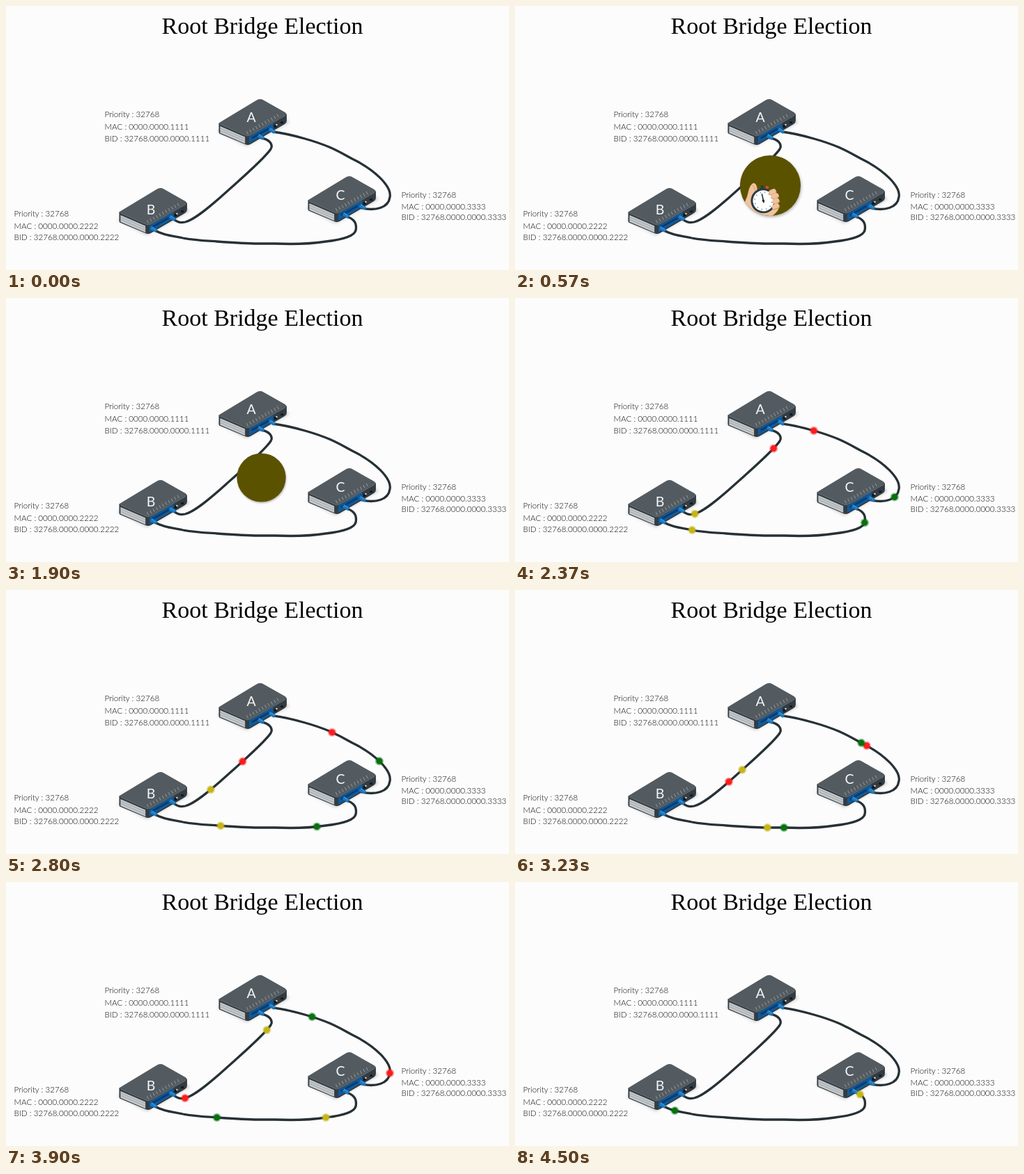
Animation of 722 by 380 pixels, one loop 4.53 s. Source, as an HTML page:

```html
<!DOCTYPE html>
<html lang="en">
<head>
<meta charset="utf-8">
<title>Root Bridge Election</title>
<style>
  html, body { margin: 0; height: 100%; overflow: hidden; background: #fcfcfc; }
  svg { display: block; width: 722px; height: 380px; }
  .title { font: 34px "Liberation Serif", serif; text-anchor: middle; fill: #000; }
  .info { font: 300 11.6px Lato, sans-serif; fill: #0c0c0c; }
  .label { font: 19.5px Lato, sans-serif; fill: #f4f6f7; text-anchor: middle; }
  .cable { fill: none; stroke: #263136; stroke-width: 3.3; stroke-linecap: round; }
  .plug { stroke: #1a7ac4; stroke-width: 5; }
</style>
</head>
<body>
<svg viewBox="0 0 722 380">
  <defs>
    <filter id="blur" x="-30%" y="-30%" width="160%" height="160%"><feGaussianBlur stdDeviation="2"/></filter>
    <clipPath id="disc"><circle r="43.5"/></clipPath>
    <pattern id="weave" width="6" height="6" patternUnits="userSpaceOnUse" patternTransform="rotate(40)">
      <rect width="6" height="6" fill="#e8661f"/>
      <path d="M0 0h3v3h-3z" fill="#f6a72c"/>
    </pattern>
    <g id="router" transform="translate(354.2 167.2) scale(.965) translate(-354.5 -168)">
      <path d="M301 181L345 204L409 168L400 160Z" fill="#aaa" opacity=".6" filter="url(#blur)"/>
      <path d="M304 169V183Q304 185 307 186L343 201Q347 203 351 201L402 171Q405 169 405 166V156Z" fill="#333c42"/>
      <path d="M306 174L343 190V200L306 184Z" fill="#c5c9cc"/>
      <path d="M306 177L343 193M306 180.5L343 196.5" stroke="#92999d" stroke-width=".8"/>
      <path d="M349 190L385 169V179L349 200Z" fill="#0f5a9c"/>
      <path d="M353 192L378 178" stroke="#083c70" stroke-width="3"/>
      <path d="M388 172v4M398 167v3" stroke="#11181b" stroke-width="4"/>
      <circle cx="390" cy="172" r="1.3" fill="#cfd5d8"/>
      <path d="M306 168L359 136Q365 132 370 135L402 153Q407 156 402 159L352 187Q347 190 342 187L307 172Q303 170 306 168Z" fill="#535b61"/>
      <path d="M306 171L342 187Q347 190 352 187L403 158" fill="none" stroke="#666f75"/>
      <path d="M346 184L396 156" stroke="#8f989d" stroke-width="5" stroke-dasharray="1 4.2"/>
    </g>
  </defs>

  <rect width="722" height="380" fill="#fcfcfc"/>
  <text class="title" x="368" y="40">Root Bridge Election</text>
  <g id="routers"></g>
  <path class="cable" id="AB" d="M366 190C378 192 384 199 380 206C372 218 345 242 326 259L307 276C291 290 270 308 257 311C247 313 244 309 239 306"/>
  <path class="cable" id="AC" d="M383 181C400 183 415 187 429 191C465 201 480 211 497 220C530 236 554 260 551 275C549 291 530 295 511 291"/>
  <path class="cable" id="BC" d="M212 322C225 330 240 331 254 334C270 337 290 338 303 339C330 341 345 342 362 342H386C410 343 440 342 459 339C485 336 500 331 502 323C504 313 500 306 488 303"/>
  <g id="plugs"></g>
  <g id="dots"></g>

  <g id="timer">
    <circle r="43" cx="1" cy="2" opacity=".35" filter="url(#blur)"/>
    <circle r="43.5" fill="#5b5200"/>
    <g clip-path="url(#disc)"><g id="hand">
      <path d="M-45 22L-25 10L-8 30L-26 44Z" fill="url(#weave)"/>
      <path d="M-27 12C-29 4 -29 -5 -23 -11C-16 -16 -12 -28 -4 -29C2 -28 -1 -18 -4 -13L16 19C8 26 -2 25 -10 30Z" fill="#f0c39b"/>
      <path d="M-6 -27C-3 -25 -4 -20 -6 -17" fill="none" stroke="#d79f75"/>
      <path d="M5 -15L7 -21" stroke="#2a3a47" stroke-width="4"/>
      <path d="M11 -14L14 -17" stroke="#d84a32" stroke-width="4"/>
      <circle r="18" fill="#2a3a47"/>
      <circle r="15" fill="#fff"/>
      <circle r="12.5" fill="none" stroke="#71808a" stroke-width="2" stroke-dasharray="1 5.54"/>
      <path d="M-.5 3L2 -10" stroke="#222e36" stroke-width="1.6"/>
      <circle r="1.8" fill="#222e36"/>
      <path d="M15 -6H19M16 1H20M15 8H18M11 15H15" stroke="#d79f75" stroke-width="7.4" stroke-linecap="round"/>
      <path d="M15 -7H19M16 0H20M15 7H18M11 14H15" stroke="#f0c39b" stroke-width="6.4" stroke-linecap="round"/>
    </g></g>
  </g>
</svg>
<script>
const LOOP = 4530;
const $ = id => document.getElementById(id);

function add(parent, tag, attrs, text = "") {
  const el = document.createElementNS("http://www.w3.org/2000/svg", tag);
  for (const key in attrs) el.setAttribute(key, attrs[key]);
  el.textContent = text;
  return parent.appendChild(el);
}

// name, router offset, label position, text left edge, text baselines, MAC digit
const routers = [
  ["A", 0, 0, 352, 167, 141.5, [160, 178, 195], 1],
  ["B", -143, 128, 208, 300, 11.5, [303, 321, 337], 2],
  ["C", 128, 111, 480, 279, 567.5, [276, 293, 308], 3],
];
for (const [name, dx, dy, lx, ly, x, lines, digit] of routers) {
  const mac = "0000.0000." + String(digit).repeat(4);
  const info = ["Priority : 32768", "MAC : " + mac, "BID : 32768." + mac];
  add($("routers"), "use", { href: "#router", x: dx, y: dy });
  add($("routers"), "text", { class: "label", x: lx, y: ly }, name);
  info.forEach((line, i) => add($("routers"), "text", { class: "info", x, y: lines[i] }, line));
}

for (const [x, y] of [[366, 189], [382, 180], [212, 322], [239, 306], [488, 302], [512, 290]]) {
  add($("plugs"), "path", { class: "plug", d: `M${x - 4} ${y - 3}l8 5` });
  add($("plugs"), "path", { d: `M${x - 3} ${y - 4}l6 4`, stroke: "#4a9fdc" });
}

// Distance along a path at which it passes closest to a point
function locate(path, [x, y]) {
  let best = 0, least = Infinity;
  for (let s = 0; s <= path.getTotalLength(); s += 0.5) {
    const p = path.getPointAtLength(s), gap = Math.hypot(p.x - x, p.y - y);
    if (gap < least) [best, least] = [s, gap];
  }
  return best;
}

const RED = "#fb1d1d", GREEN = "#08700f", YELLOW = "#c6b516";
const END_GAP = 4;
const times = [2370, 3230, 3900, 4500];
const dots = [
  ["AB", RED, [371, 216], [307, 276], [257, 310]],
  ["AC", RED, [429, 191], [505, 224], [550, 275]],
  ["AB", YELLOW, [258, 310], [326, 259], [374, 213]],
  ["BC", YELLOW, [254, 334], [362, 342], [459, 339], [494, 308]],
  ["AC", GREEN, [545, 287], [497, 220], [439, 195]],
  ["BC", GREEN, [502, 323], [386, 342], [303, 339], [230, 328]],
].map(([cable, color, ...points]) => {
  const path = $(cable), el = add($("dots"), "g", { fill: color });
  add(el, "circle", { r: 6.2, opacity: 0.4 });
  add(el, "circle", { r: 4.5 });
  return { path, el, stops: points.map(p => locate(path, p)) };
});

const clamp = v => Math.min(1, Math.max(0, v));
const easeOut = p => 1 - (1 - p) ** 3;
const phase = (t, start, length) => easeOut(clamp((t - start) / length));

function drawTimer(t) {
  const size = phase(t, 60, 330) * (1 - clamp((t - 1800) / 230) ** 2);
  const away = 1 - phase(t, 460, 360) + clamp((t - 1600) / 240) ** 2;
  $("timer").setAttribute("transform", `translate(366.5 258.5) scale(${size})`);
  $("hand").setAttribute("transform", `translate(${6.5 - 50 * away} ${66 * away}) rotate(${-70 * away})`);
}

function drawDot({ path, el, stops }, t) {
  let i = 0;
  while (i < stops.length - 2 && t > times[i + 1]) i++;
  const speed = (stops[i + 1] - stops[i]) / (times[i + 1] - times[i]);
  const s = stops[i] + speed * (t - times[i]);
  const shown = s >= END_GAP && s <= path.getTotalLength() - END_GAP;
  el.setAttribute("visibility", shown ? "visible" : "hidden");
  const p = path.getPointAtLength(s);
  el.setAttribute("transform", `translate(${p.x} ${p.y})`);
}

function frame() {
  const t = performance.now() % LOOP;
  drawTimer(t);
  dots.forEach(dot => drawDot(dot, t));
  requestAnimationFrame(frame);
}
frame();
</script>
</body>
</html>
```
